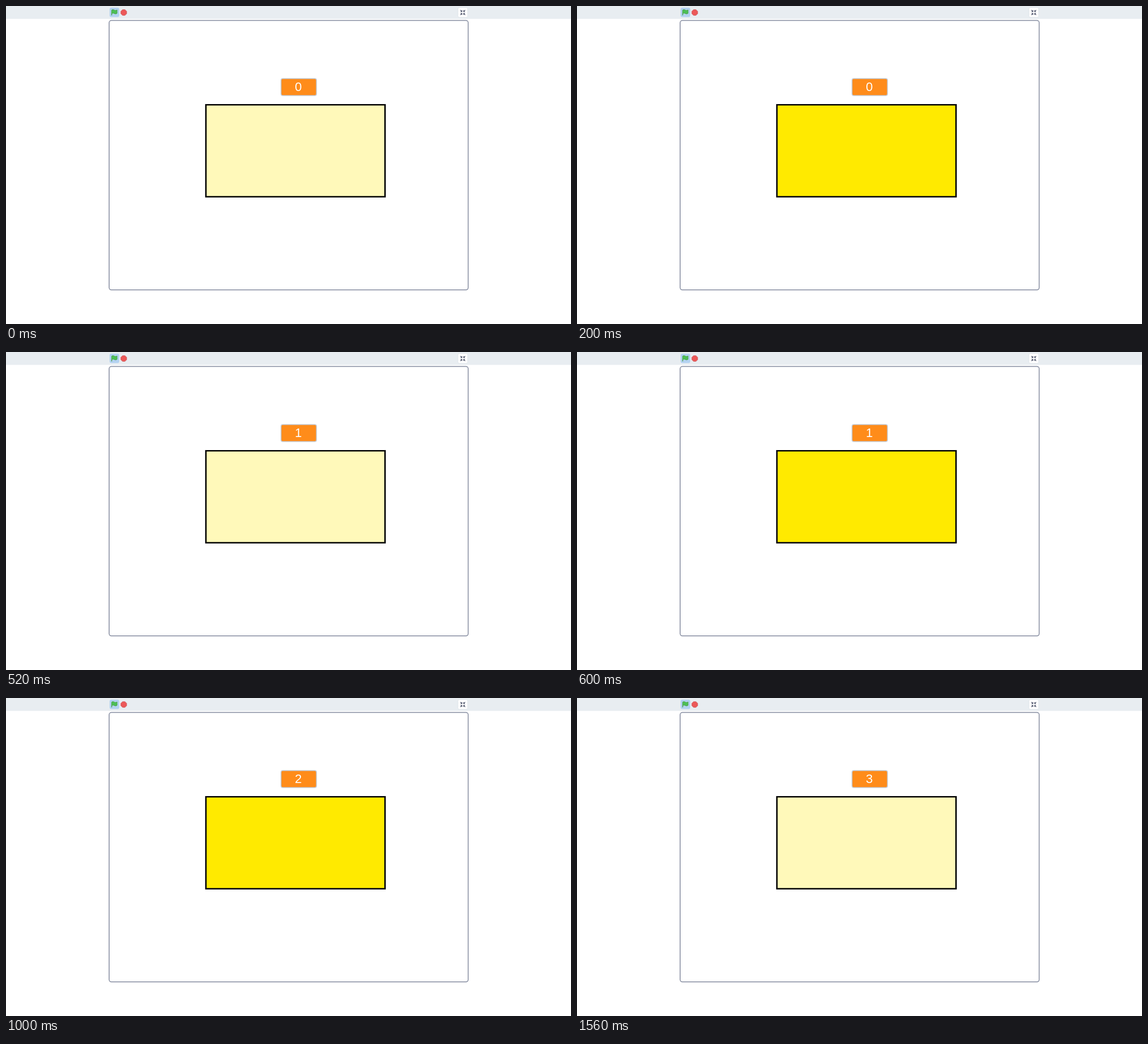
An HTML page with a canvas for the animation above (1800 ms loop, 998 px wide and 561 px high).

```html
<!DOCTYPE html>
<html lang="en">
<head>
<meta charset="utf-8">
<title>Blinking counter</title>
<style>
  html, body { margin: 0; width: 100%; height: 100%; overflow: hidden; background: #fff; }
  canvas { display: block; }
</style>
</head>
<body>
<canvas id="stage" width="998" height="561"></canvas>
<script>
const ctx = document.getElementById('stage').getContext('2d');
const LOOP = 1800, STEP = 200, LAST = 6;

function box(x, y, w, h, r, fill, stroke, line) {
  ctx.beginPath();
  ctx.roundRect(x, y, w, h, r);
  if (fill) { ctx.fillStyle = fill; ctx.fill(); }
  if (stroke) { ctx.strokeStyle = stroke; ctx.lineWidth = line; ctx.stroke(); }
}

function drawFlag() {
  box(183, 3, 17, 16.5, 3, '#b3d2f1');
  ctx.beginPath();
  ctx.moveTo(186.6, 7.2);
  ctx.bezierCurveTo(188.4, 5.8, 190, 6.4, 191.4, 7.2);
  ctx.bezierCurveTo(193, 8, 194.6, 7.8, 196.2, 6.9);
  ctx.lineTo(196.2, 13);
  ctx.bezierCurveTo(194.6, 14.2, 193, 14.2, 191.4, 13.4);
  ctx.bezierCurveTo(190, 12.6, 188.6, 12.5, 187, 13.3);
  ctx.lineTo(187, 16.2);
  ctx.lineTo(186.4, 16.2);
  ctx.closePath();
  ctx.fillStyle = '#4cbf56';
  ctx.fill();
  ctx.strokeStyle = '#45993d';
  ctx.lineWidth = 0.7;
  ctx.stroke();
}

function drawStop() {
  ctx.beginPath();
  for (let i = 0; i < 8; i++) {
    const a = (i + 0.5) * Math.PI / 4;
    ctx.lineTo(208 + 5.5 * Math.cos(a), 11.5 + 5.5 * Math.sin(a));
  }
  ctx.closePath();
  ctx.fillStyle = '#ec5959';
  ctx.fill();
  ctx.strokeStyle = '#c8494f';
  ctx.lineWidth = 0.7;
  ctx.stroke();
}

// Four arrows pointing at the centre
function drawShrink() {
  box(798.3, 2.8, 17.2, 17.2, 2.5, '#fff', '#dce2e8', 0.8);
  ctx.strokeStyle = '#50566c';
  ctx.lineWidth = 1.2;
  for (const sx of [-1, 1]) for (const sy of [-1, 1]) {
    ctx.save();
    ctx.translate(806.8, 11.5);
    ctx.scale(sx, sy);
    ctx.beginPath();
    ctx.moveTo(4.3, 4.3);
    ctx.lineTo(1.6, 1.6);
    ctx.moveTo(1.5, 4);
    ctx.lineTo(1.5, 1.5);
    ctx.lineTo(4, 1.5);
    ctx.stroke();
    ctx.restore();
  }
}

function draw(time) {
  const step = Math.min(LAST, Math.floor(time % LOOP / STEP));
  ctx.fillStyle = '#fff';
  ctx.fillRect(0, 0, 998, 561);
  ctx.fillStyle = '#e8edf1';
  ctx.fillRect(0, 0, 998, 22.7);
  drawFlag();
  drawStop();
  drawShrink();
  box(182.2, 25.6, 634.2, 475.2, 4, '#fff', '#858ca0', 1.5);

  box(485.8, 128, 62.6, 30, 3, '#ff8c1a', '#c4ccd8', 1.5);
  ctx.fillStyle = '#fff';
  ctx.font = '22px "Liberation Sans", Arial, sans-serif';
  ctx.textAlign = 'center';
  ctx.fillText(Math.floor(step / 2), 516.4, 150);

  box(353.1, 174.2, 316.4, 162.3, 0, step % 2 ? '#ffea00' : '#fff9ba', '#000', 2.6);
}

function tick() {
  draw(performance.now());
  requestAnimationFrame(tick);
}
tick();
</script>
</body>
</html>
```
